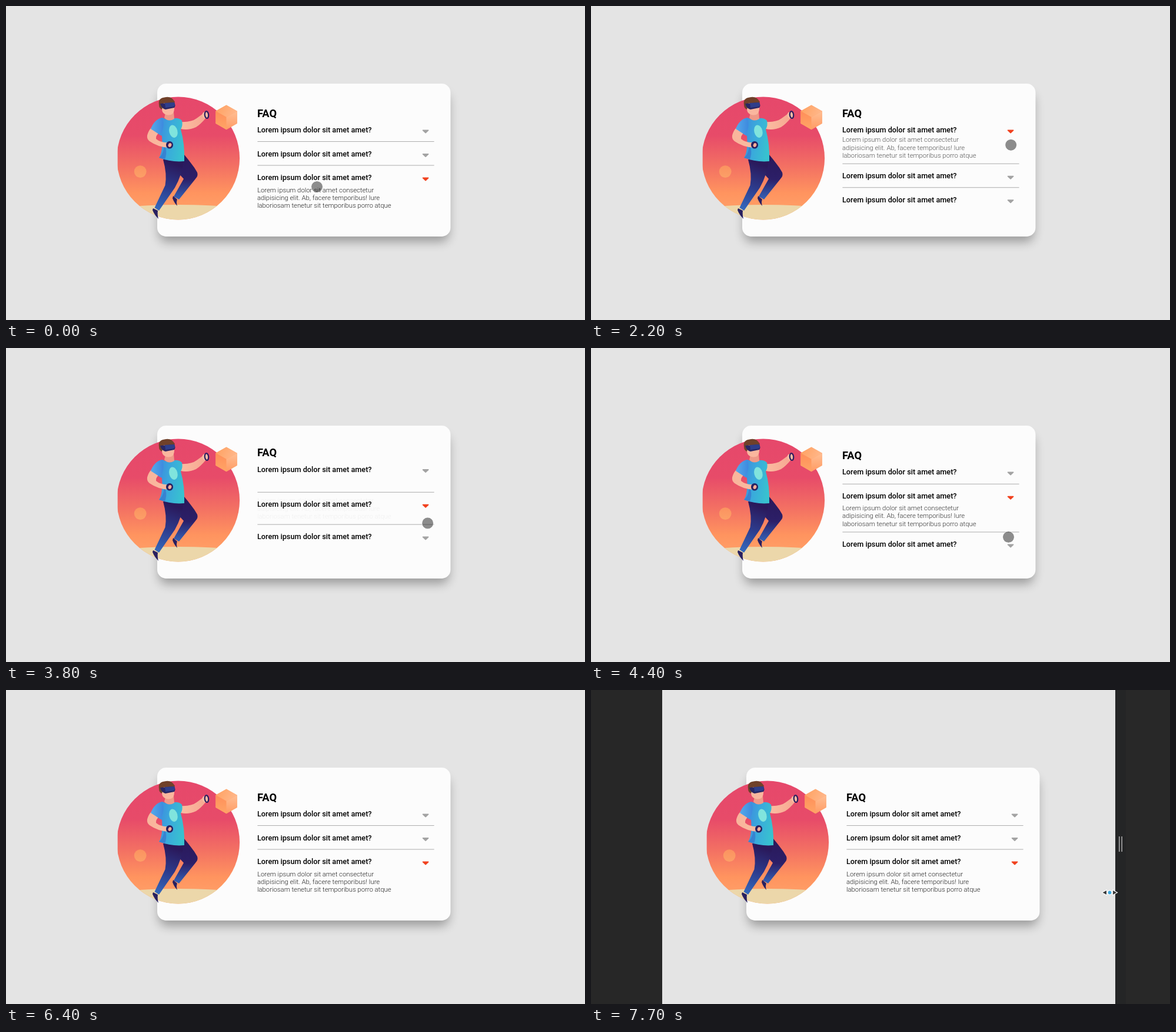
Recreate the animation shown at these times as an HTML page with a canvas. Size 984x534 px, loop 8 s.

```html
<!DOCTYPE html>
<html lang="en">
<head>
<meta charset="utf-8">
<title>FAQ accordion</title>
<style>
html, body { margin: 0; width: 100%; height: 100%; overflow: hidden; background: #e4e4e4; }
canvas { display: block; width: 984px; height: 534px; }
</style>
</head>
<body>
<canvas id="stage" width="984" height="534"></canvas>
<script>
const ctx = document.getElementById('stage').getContext('2d');
const W = 984, H = 534, LOOP = 8000;
const FONT = 'Roboto, sans-serif';
const QUESTION = 'Lorem ipsum dolor sit amet amet?';
const ANSWER = [
  'Lorem ipsum dolor sit amet consectetur',
  'adipisicing elit. Ab, facere temporibus! Iure',
  'laboriosam tenetur sit temporibus porro atque'
];
const ROW = 40.5, OPEN = 42;

const TICKS = [[0, 1100], [1300, 1300], [1600, 2400], [2900, 3000], [3200, 3200],
  [3400, 3400], [3600, 3600], [3800, 4100], [4300, 4600], [4800, 4800], [5200, 5200],
  [5400, 5400], [5600, 5700], [5900, 5900], [6100, 6200], [6400, 6400], [6900, 6900],
  [7200, 7200], [7500, 7500], [7700, 7700]];
const CLICKS = [
  { at: -9000, open: 2, close: 0 },
  { at: 1580, open: 0, close: 2 },
  { at: 3580, open: 1, close: 0 },
  { at: 5150, open: 2, close: 1 }
];
// [time, x, y]
const POINTER = [[0, 528.5, 307.5], [300, 585, 329], [600, 672, 292], [900, 705, 218],
  [1100, 718, 214], [1300, 717, 213.5], [1800, 709.5, 217], [2100, 711, 222],
  [2400, 719, 265], [2900, 721.5, 296.5], [3000, 720, 296.5], [3400, 717.5, 296.5],
  [4100, 716, 299], [4400, 709.5, 321.5], [4600, 711, 331], [5400, 713, 335],
  [5600, 749.5, 336.5], [5700, 824, 353], [5900, 929, 359]];
// Gap between panel and page edge: [time, left edge]
const PANEL = [[7200, 9], [7500, 76], [7700, 121]];
const RESIZER = [[7200, 984.5, 320.5], [7500, 928, 335], [7700, 881.5, 344.5]];
// Height briefly missing from the list after a click: [seconds, px]
const DIP = [[0, 0], [0.02, 8.6], [0.22, 8.6], [0.28, 4], [0.45, 0]];

function snap(t) {
  let now = 0;
  for (const [a, b] of TICKS) if (t >= a) now = Math.min(b, a + Math.floor((t - a) / 100) * 100);
  return now;
}

function track(keys, t) {
  if (t <= keys[0][0]) return keys[0].slice(1);
  for (let i = 1; i < keys.length; i++) {
    const a = keys[i - 1], b = keys[i];
    if (t <= b[0]) {
      const k = (t - a[0]) / (b[0] - a[0]);
      return a.slice(1).map((v, j) => v + (b[j + 1] - v) * k);
    }
  }
  return keys[keys.length - 1].slice(1);
}

// cubic-bezier(.25, .1, .25, 1)
function ease(x) {
  if (x <= 0) return 0;
  if (x >= 1) return 1;
  const curve = (p, q, u) => 3 * p * u * (1 - u) ** 2 + 3 * q * u * u * (1 - u) + u ** 3;
  let lo = 0, hi = 1;
  for (let i = 0; i < 24; i++) {
    const mid = (lo + hi) / 2;
    if (curve(0.25, 0.25, mid) < x) lo = mid; else hi = mid;
  }
  return curve(0.1, 1, lo);
}

function ramp(x0, y0, x1, y1, ...colors) {
  const g = ctx.createLinearGradient(x0, y0, x1, y1);
  colors.forEach((c, i) => g.addColorStop(i / (colors.length - 1), c));
  return g;
}

function shape(d, fill) {
  ctx.fillStyle = fill;
  ctx.fill(new Path2D(d));
}

function oval(x, y, rx, ry, fill, turn = 0) {
  ctx.beginPath();
  ctx.ellipse(x, y, rx, ry, turn, 0, 7);
  ctx.fillStyle = fill;
  ctx.fill();
}

function write(text, x, y, weight, size, fill) {
  ctx.font = `${weight} ${size}px ${FONT}`;
  ctx.fillStyle = fill;
  ctx.fillText(text, x, y);
}

function drawCard() {
  ctx.save();
  ctx.shadowColor = 'rgba(0,0,0,.32)';
  ctx.shadowBlur = 17;
  ctx.shadowOffsetY = 9;
  ctx.beginPath();
  ctx.roundRect(260, 140, 492.5, 252, 14);
  ctx.fillStyle = '#fcfcfc';
  ctx.fill();
  ctx.restore();
  ctx.beginPath();
  ctx.roundRect(257, 132, 498.5, 260, 15);
  ctx.fillStyle = '#fcfcfc';
  ctx.fill();
}

function drawScene() {
  ctx.save();
  ctx.beginPath();
  ctx.rect(189.7, 150, 220, 220);
  ctx.clip();
  ctx.beginPath();
  ctx.arc(292.7, 259, 104.4, 0, 7);
  ctx.clip();
  const sky = ctx.createLinearGradient(0, 155, 0, 364);
  sky.addColorStop(0, '#e6486b');
  sky.addColorStop(0.31, '#e74b69');
  sky.addColorStop(0.56, '#f37063');
  sky.addColorStop(0.78, '#ff945f');
  sky.addColorStop(1, '#ffa56c');
  ctx.fillStyle = sky;
  ctx.fillRect(180, 150, 230, 220);
  shape('M180 344Q293 332 410 344V370H180Z', '#ecd7aa');
  ctx.restore();
  oval(228.2, 281.6, 10.4, 10.4, ramp(0, 271, 0, 292, '#fb9260', '#fca067'));
}

function drawCube() {
  shape('M374.5 168.5L392.7 178.7V199.8L374.5 210.2L356.3 199.8V178.7Z', '#ff9b61');
  shape('M374.5 168.5L392.7 178.7L374.5 189L356.3 178.7Z', ramp(360, 172, 388, 187, '#ffa364', '#ffb78a'));
  shape('M356.3 178.7L374.5 189V210.2L356.3 199.8Z', ramp(0, 180, 0, 208, '#ff8f5a', '#ffa465'));
  shape('M374.5 189L392.7 178.7V199.8L374.5 210.2Z', ramp(0, 180, 0, 208, '#ffbd91', '#ff9e67'));
}

function drawPerson() {
  const skin = ramp(240, 0, 345, 0, '#f9b49b', '#fbbfa3', '#f6a58f');
  const navy = '#282061';
  // legs and shoes
  shape('M284 262L303 253C311 263 319 272 325 283Q327 289 322 294L294 329L285 324L302 294L289 280Z',
    ramp(300, 260, 296, 328, '#2a1a5c', '#2c1f68', '#3361b5'));
  shape('M267 261L302 262Q299 288 287 309L260 348L252.500 343L270.500 305Q274 286 267 261Z',
    ramp(285, 268, 257, 346, '#2a195b', '#2d3b8c', '#3469bd'));
  shape('M250 344L258 348Q257 354 259 362Q252 355 249 347Z', navy);
  shape('M284 323L291 329Q289 333 291 340Q286 335 283 327Z', navy);
  // far arm
  shape('M296 197Q315 198 324 191L335 183L340 190Q331 201 323 206Q310 212 297 209Z', skin);
  oval(338.5, 185.5, 5, 5.5, '#fbbda4');
  ctx.strokeStyle = navy;
  ctx.lineWidth = 2.2;
  ctx.beginPath();
  ctx.ellipse(341, 185, 3.2, 6, -0.1, 0, 7);
  ctx.stroke();
  // shirt
  shape('M266 190Q276 196 286 191Q294 190 299 195Q301 203 297 210Q304 234 303 264Q281 266 260 258Q267 247 265 221L246 210Q254 192 266 190Z',
    ramp(252, 220, 303, 228, '#3e86de', '#3aa9dc', '#38c2cf'));
  shape('M263 226Q270 233 268 243Q266 254 260 258L270 261Q277 242 263 226Z', 'rgba(52,105,200,.55)');
  oval(284.4, 213.2, 7, 11, '#80e4dd', -0.25);
  // near arm
  shape('M247 207L261 214Q254 221 255 226Q263 233 277 232L277 241Q258 240 244 230Q239 226 240 220Q242 212 247 207Z', skin);
  shape('M246 209Q252 193 265 190Q271 200 263 220Z', ramp(247, 205, 270, 205, '#54a8ea', '#3b86dd'));
  oval(278, 236.3, 6, 6.3, navy);
  oval(278.500, 236.500, 2.8, 3.5, '#f8ad98', 0.3);
  // head
  shape('M272 178L285 180L286 192Q276 198 269 190Z', '#ef9a88');
  shape('M262 165Q274 158 286 169Q287 183 280 185Q270 187 266 180Z', '#fab69e');
  shape('M260 168Q258 157 269 155.500Q281 152 287 163L285 167L268 165L265 176Q260 174 260 168Z', '#70412a');
  shape('M262 166L286 164Q289 169 286 173L271 176Q264 174 262 166Z', '#292765');
  shape('M270 165L286 164Q288 168 285.500 171L271 173Z', '#2f3e8b');
}

function drawArrow(y, fill) {
  ctx.beginPath();
  ctx.moveTo(708.6, y - 2.1);
  ctx.lineTo(717.6, y - 2.1);
  ctx.lineTo(713.1, y + 2.1);
  ctx.closePath();
  ctx.lineWidth = 1.8;
  ctx.lineJoin = 'round';
  ctx.fillStyle = ctx.strokeStyle = fill;
  ctx.fill();
  ctx.stroke();
}

function drawList(t) {
  const click = CLICKS.filter(c => t >= c.at).pop();
  const age = (t - click.at) / 1000;
  const e = ease(age), [dip] = track(DIP, age);
  const extra = [0, 0, 0];
  extra[click.close] = Math.max(0, OPEN * (1 - e) - dip);
  extra[click.open] = OPEN * e;

  let y = 210.8 - dip / 2;
  write('FAQ', 427, y - 22.3, 700, 18.3, '#000');
  for (let i = 0; i < 3; i++) {
    const active = i === click.open;
    write(QUESTION, 427, y + 4.2, 500, 12.7, '#000');
    drawArrow(y + 2.6, active ? '#f1421f' : '#a3a3a3');
    if (active) {
      ctx.globalAlpha = ease(age - 0.15);
      const top = y + 24.7 - OPEN + extra[i];
      ANSWER.forEach((line, n) => write(line, 427, top + n * 13.4, 300, 11.3, '#222'));
      ctx.globalAlpha = 1;
    }
    if (i < 2) {
      ctx.fillStyle = '#adadad';
      ctx.fillRect(427.4, y + 19.2 + extra[i], 300.2, 1);
    }
    y += ROW + extra[i];
  }
}

function drawPointer(t) {
  const [x, y] = track(POINTER, t);
  ctx.beginPath();
  ctx.arc(x, y, 9.6, 0, 7);
  ctx.fillStyle = 'rgba(25,25,25,.49)';
  ctx.fill();
  ctx.beginPath();
  ctx.arc(x, y, 10, 0, 7);
  ctx.lineWidth = 1;
  ctx.strokeStyle = 'rgba(255,255,255,.6)';
  ctx.stroke();
}

function drawResizer(t) {
  const [x, y] = track(RESIZER, t);
  ctx.lineWidth = 2;
  ctx.strokeStyle = '#fff';
  for (const s of [-1, 1]) {
    const tip = new Path2D(`M${x + s * 12} ${y}L${x + s * 5.5} ${y - 3.5}V${y + 3.5}Z`);
    ctx.stroke(tip);
    ctx.fillStyle = '#3b3b3b';
    ctx.fill(tip);
  }
  oval(x, y, 4, 4, '#fff');
  oval(x, y, 2.9, 2.9, '#3ba6dc');
}

function drawPanels(left) {
  const right = 1012 - left;
  ctx.fillStyle = '#272727';
  ctx.fillRect(0, 0, left, H);
  if (right >= W) return;
  ctx.fillStyle = '#282828';
  ctx.fillRect(right, 0, W - right, H);
  ctx.fillStyle = '#242526';
  ctx.fillRect(right, 0, 18, H);
  ctx.fillStyle = '#a9a9a9';
  ctx.fillRect(right + 6, 249, 1.6, 26);
  ctx.fillRect(right + 10.4, 249, 1.6, 26);
}

function draw(t) {
  const resizing = t >= 7200;
  const [left] = track(PANEL, t);
  const shift = t < 6900 ? 0 : -0.5 + (left - 9) / 112 * 7.5;
  ctx.fillStyle = '#e4e4e4';
  ctx.fillRect(0, 0, W, H);
  ctx.save();
  ctx.translate(shift, 0);
  drawCard();
  drawScene();
  drawCube();
  drawPerson();
  drawList(t);
  ctx.restore();
  if (t < 6100) drawPointer(t);
  if (resizing) {
    drawPanels(left);
    drawResizer(t);
  }
}

const start = performance.now();
function loop() {
  draw(snap((performance.now() - start) % LOOP));
  requestAnimationFrame(loop);
}
loop();
</script>
</body>
</html>
```
